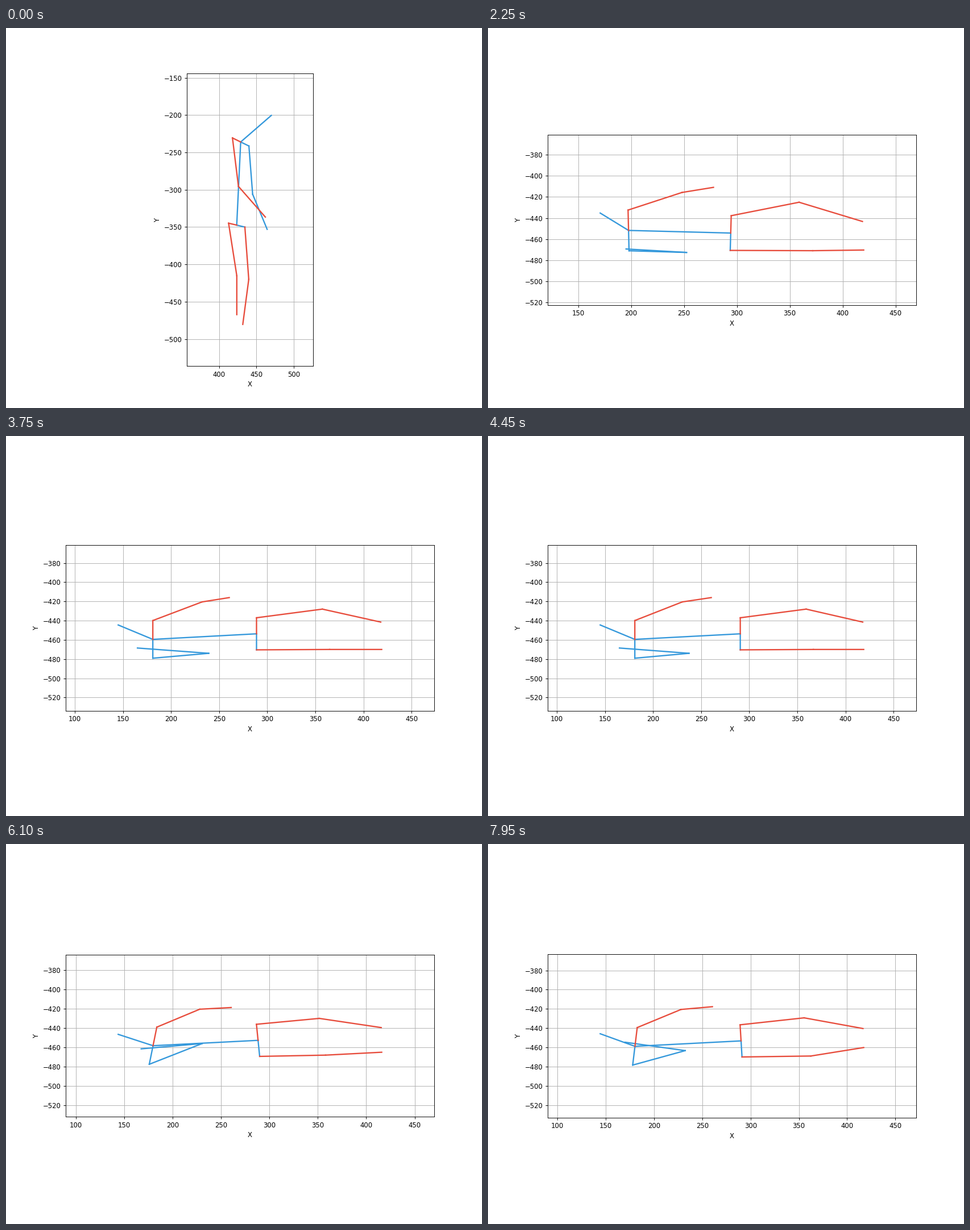
A matplotlib script that plays this animation: 837x669 px, repeating every 8 s.

```python
import numpy as np
import matplotlib.pyplot as plt
from matplotlib.animation import FuncAnimation

DPI = 83.7
STEP, FRAMES = 50, 160
BLUE, RED = "#3498db", "#e74c3c"

# Standing, seated and lying position of each joint as x + yj.
# The girdles are vectors from neck or pelvis to the right side.
KEYS = {
    "head": (470 - 200.4j, 351.6 - 370.5j, 145 - 444.5j),
    "neck": (429 - 236j, 314 - 397.1j, 181 - 459.5j),
    "pelvis": (423.7 - 347.4j, 335.8 - 457.6j, 290 - 453.7j),
    "shoulders": (-11 + 5.4j, -3.7 + 16.9j, 19.6j),
    "hips": (-10.9 + 2.6j, 3.7 + 14.5j, 16.7j),
    "r_elbow": (426 - 295.5j, 356.5 - 382.6j, 231 - 420.5j),
    "r_wrist": (462 - 336.6j, 400 - 375.4j, 260.5 - 416j),
    "l_elbow": (445 - 306j, 341.8 - 462.4j, 238 - 474j),
    "l_wrist": (464.4 - 353j, 407.2 - 474.6j, 165 - 468.5j),
    "r_knee": (423.8 - 415.2j, 373.4 - 404.3j, 358.5 - 428j),
    "r_ankle": (423.8 - 467.3j, 424.1 - 455.3j, 418 - 441.5j),
    "l_knee": (439.8 - 420j, 424.1 - 477j, 366 - 470j),
    "l_ankle": (431.8 - 480.4j, 426.6 - 472.1j, 419 - 470j),
}
CHAINS = [
    (BLUE, "head neck l_shoulder l_elbow l_wrist"),
    (BLUE, "neck pelvis l_hip"),
    (RED, "neck r_shoulder r_elbow r_wrist"),
    (RED, "pelvis r_hip r_knee r_ankle"),
    (RED, "l_hip l_knee l_ankle"),
]


def pose(t):
    fall = np.clip(t / 1450, 0, 1) ** 0.8
    roll = 1 - (1 - np.clip((t - 1450) / 1600, 0, 1)) ** 3
    j = {name: a + (b - a) * fall + (c - b) * roll
         for name, (a, b, c) in KEYS.items()}

    # Slow stretch of the lying body.
    drift = np.interp(t, [1450, 3050, 5350], [0, -3, 3])
    for name in ("pelvis", "r_knee", "l_knee"):
        j[name] += drift
    for name in ("r_elbow", "l_elbow"):
        j[name] -= drift

    # The body stirs and relaxes; left hand and foot stay raised.
    stir = np.interp(t, [5350, 6850, 7950], [0, 1, 0.3])
    lift = np.interp(t, [5350, 6850], [0, 1])
    j["head"] -= (2.5 + 4j) * stir
    j["neck"] -= (2.5 - 2.5j) * stir
    j["pelvis"] -= (9.5 - 2j) * stir
    j["shoulders"] *= np.exp(-0.4j * stir)
    j["hips"] *= np.exp(0.2j * stir)
    j["l_elbow"] -= (9 - 36j) * stir
    j["l_wrist"] += (5 + 14j) * lift
    j["r_wrist"] -= 5.5j * stir
    j["r_knee"] -= (20 + 4j) * stir
    j["l_knee"] -= (22 - 4j) * stir
    j["r_ankle"] -= (5 - 4j) * stir
    j["l_ankle"] += 10j * lift - 6 * stir

    shoulders, hips = j.pop("shoulders"), j.pop("hips")
    for side, sign in (("r", 1), ("l", -1)):
        j[side + "_shoulder"] = j["neck"] + sign * shoulders
        j[side + "_hip"] = j["pelvis"] + sign * hips
    return j


# The extra hundredth keeps the pixel size from rounding down.
fig, ax = plt.subplots(figsize=(837.01 / DPI, 669.01 / DPI), dpi=DPI)
ax.set_aspect("equal", adjustable="box")
ax.set_xlabel("X")
ax.set_ylabel("Y")
ax.grid(True)

bones = []
for color, chain in CHAINS:
    names = chain.split()
    for start, end in zip(names, names[1:]):
        line, = ax.plot([], [], color=color, lw=2, snap=False)
        bones.append((line, start, end))


def update(i):
    j = pose(i * STEP)
    for line, start, end in bones:
        ends = np.array([j[start], j[end]])
        line.set_data(ends.real, ends.imag)
    pts = np.array(list(j.values()))
    x, y = pts.real, pts.imag
    pad = 0.2 * max(np.ptp(x), np.ptp(y))
    ax.set_xlim(x.min() - pad, x.max() + pad)
    ax.set_ylim(y.min() - pad, y.max() + pad)
    return [bone[0] for bone in bones]


anim = FuncAnimation(fig, update, frames=FRAMES, interval=STEP,
                     repeat=True, repeat_delay=0, blit=False)
plt.show()
```
